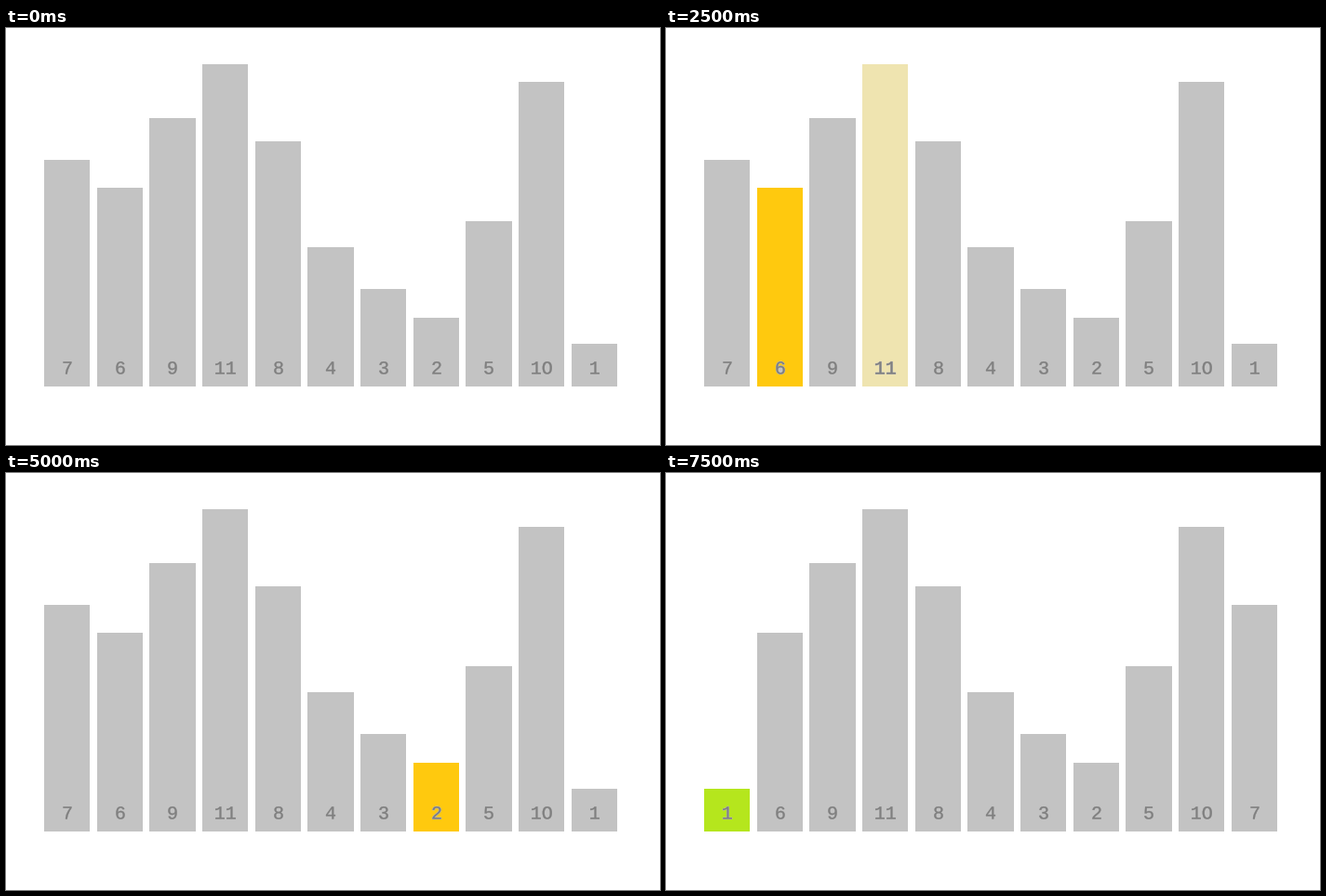
A matplotlib script that plays this animation: 703 px wide and 449 px high, repeating every 8 s.

```python
import matplotlib.pyplot as plt
from matplotlib.animation import FuncAnimation
from matplotlib.patches import PathPatch, Polygon, Rectangle
from matplotlib.textpath import TextPath
from matplotlib.transforms import Affine2D

W, H, DPI = 703, 449, 100
LEFT, PITCH, WIDTH = 41, 56.67, 49.35
FLOOR, BASELINE = 386, 372.5
GRAY, MINIMUM, PROBE, SORTED = "#c3c3c3", "#ffc90e", "#efe4b0", "#b5e61d"
INK = "#7f7f7f"

HEIGHTS = [244, 214, 289, 347, 264, 150, 105, 74, 178, 328, 46]
RANKS = [sorted(HEIGHTS).index(h) + 1 for h in HEIGHTS]
COUNT = len(HEIGHTS)
SKIPPED = 6  # this bar is compared but never shown as the minimum

fig = plt.figure(figsize=(W / DPI, H / DPI), dpi=DPI, facecolor="white")
ax = fig.add_axes([0, 0, 1, 1])
ax.set_xlim(0, W)
ax.set_ylim(H, 0)
ax.axis("off")


def search():
    """Yield (current minimum, compared bar) for one selection pass."""
    low = 0
    yield None, None
    yield low, None
    for i in range(1, COUNT):
        yield low, i
        if HEIGHTS[i] < HEIGHTS[low]:
            low = i
            yield low, None


def number_path(value):
    # a capital O serves as a zero without the inner dot
    path = TextPath((0, 0), str(value).replace("0", "O"), size=20,
                    prop={"family": "Liberation Mono"})
    box = path.get_extents()
    middle = (box.x0 + box.x1) / 2
    return path.transformed(Affine2D().translate(-middle, 0).scale(1, -1))


steps = [s for s in search() if s[0] != SKIPPED] + [(None, None)]
numbers = [number_path(r) for r in RANKS]


def draw_bar(i, slot, color):
    left = round(LEFT + PITCH * slot)
    right = round(LEFT + PITCH * slot + WIDTH)
    ax.add_patch(Rectangle((left, FLOOR - HEIGHTS[i]), right - left,
                           HEIGHTS[i], fc=color, lw=0))
    shift = Affine2D().translate(left + 25, BASELINE)
    path = numbers[i].transformed(shift)
    # gray stays around and inside the digits when the bar is coloured
    for outline in path.to_polygons():
        ax.add_patch(Polygon(outline, fc=GRAY, ec=GRAY, lw=0.8))
    ax.add_patch(PathPatch(path, fc=INK, ec=INK, lw=0.25))


def draw(n):
    for patch in list(ax.patches):
        patch.remove()
    low, probe = steps[n]
    order = list(range(COUNT))
    colors = [MINIMUM if i == low else PROBE if i == probe else GRAY
              for i in order]
    if n == len(steps) - 1:
        order[0], order[-1] = order[-1], order[0]
        colors[0] = SORTED
    for slot, (i, color) in enumerate(zip(order, colors)):
        draw_bar(i, slot, color)
    return ax.patches


anim = FuncAnimation(fig, draw, frames=len(steps), interval=500,
                     repeat=True, repeat_delay=0, blit=False)
plt.show()
```
